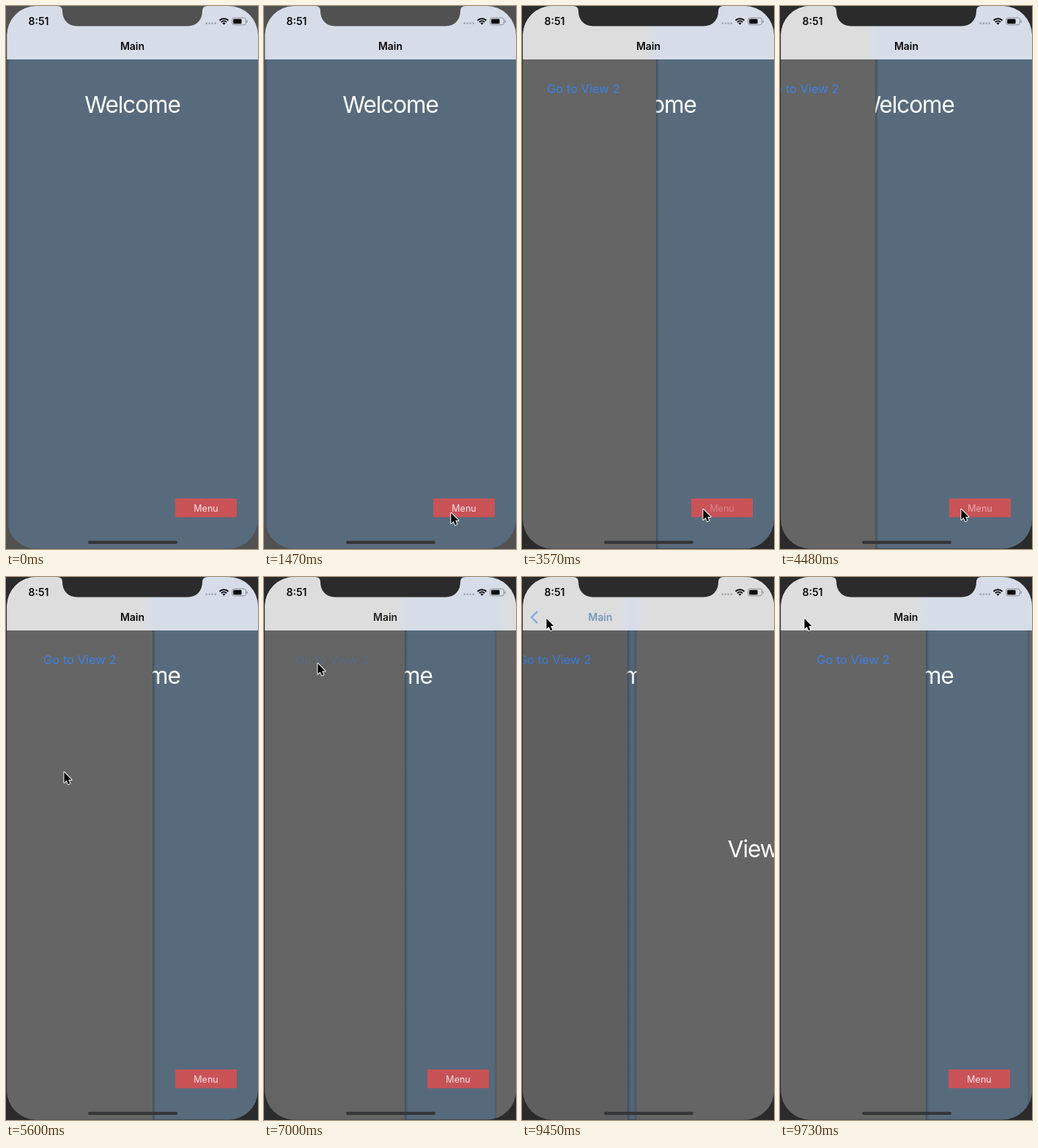
Recreate the animation shown at these times as an HTML page with a canvas. Size 344 by 742 pixels, loop 9.8 s.

```html
<!DOCTYPE html>
<html lang="en">
<head>
<meta charset="utf-8">
<title>Side menu</title>
<style>
  html, body { margin: 0; width: 100%; height: 100%; overflow: hidden; background: #2b2b2b; }
  canvas { display: block; width: 344px; height: 742px; }
</style>
</head>
<body>
<canvas id="stage"></canvas>
<script>
const W = 344, H = 742, LOOP = 9800, STEP = 70;
const MENU_W = 199, BAR_H = 73, PARALLAX = 103;
const SLATE = '#586b7d', GREY = '#656565', BLUE = '#3b82e6', INK = '#0a0a0c';
const BAR_SLATE = '#d7dde8', BAR_GREY = '#dddddd';
const PUSH = 6975, POP = 9366;
const FONT = 'Inter, Roboto, sans-serif';

const canvas = document.getElementById('stage');
const ratio = window.devicePixelRatio || 1;
canvas.width = W * ratio;
canvas.height = H * ratio;
const ctx = canvas.getContext('2d');

const clamp = v => Math.max(0, Math.min(1, v));
const smooth = v => { v = clamp(v); return v * v * (3 - 2 * v); };
const spring = ms => {
  const x = Math.max(0, ms) * 0.01826;
  return 1 - (1 + x) * Math.exp(-x);
};

// Menu button taps: [finger down, finger up]
const taps = [[1890, 1945], [3380, 3480], [4060, 4180]];

// Cursor tip: [time, x, y]
const path = [
  [280, 300, 744], [700, 276, 712], [1260, 255, 692], [1470, 255, 692],
  [1750, 247, 687], [4900, 247, 687], [5600, 79, 266], [5900, 79, 266],
  [6400, 71, 98], [6720, 73, 117.5], [8200, 73, 117.5], [8470, 44, 88.5],
  [8820, 35, 38], [9240, 33, 56], [9800, 33, 56]
];

function cursorAt(t) {
  if (t < path[0][0]) return null;
  let i = 0;
  while (i < path.length - 2 && t >= path[i + 1][0]) i++;
  const [t0, x0, y0] = path[i], [t1, x1, y1] = path[i + 1];
  const k = smooth((t - t0) / (t1 - t0));
  return [x0 + (x1 - x0) * k, y0 + (y1 - y0) * k];
}

function menuOpen(t) {
  const moved = taps.map(([, up]) => smooth((t - up) / 500));
  return moved[0] - moved[1] + moved[2];
}

function pressAlpha(t, down, up, fade) {
  if (t < down) return 1;
  return t < up ? 0.2 : 0.2 + 0.8 * clamp((t - up) / fade);
}

function menuLabelAlpha(t) {
  return Math.min(...taps.map(([down, up]) => pressAlpha(t, down, up, 600)));
}

function rect(x, y, w, h, color) {
  ctx.fillStyle = color;
  ctx.fillRect(x, y, w, h);
}

function pill(x, y, w, h, r, color) {
  ctx.fillStyle = color;
  ctx.beginPath();
  ctx.roundRect(x, y, w, h, r);
  ctx.fill();
}

function text(str, x, y, size, color, { weight = 400, align = 'center', alpha = 1, spacing = 0 } = {}) {
  ctx.font = `${weight} ${size}px ${FONT}`;
  ctx.letterSpacing = spacing + 'px';
  ctx.textAlign = align;
  ctx.fillStyle = color;
  ctx.globalAlpha = clamp(alpha);
  ctx.fillText(str, x, y);
  ctx.globalAlpha = 1;
}

function shade(x, w, strength) {
  const g = ctx.createLinearGradient(x, 0, x + w, 0);
  g.addColorStop(0, `rgba(0,0,0,${strength})`);
  g.addColorStop(1, 'rgba(0,0,0,0)');
  rect(Math.min(x, x + w), BAR_H, Math.abs(w), H, g);
}

function mainView(t, shift, open) {
  const edge = 1 + MENU_W * open;
  ctx.save();
  ctx.translate(-shift, 0);
  rect(0, 0, W + PARALLAX, H, SLATE);
  text('Welcome', 172.5, 146, 31.5, '#fff', { spacing: -1.1 });
  rect(231, 673, 84, 25.5, '#c95357');
  text('Menu', 273, 691, 12.5, '#f6e6e7', { alpha: menuLabelAlpha(t) });
  shade(edge, 4.5, 0.26);
  rect(edge - 220, 0, 220, H, GREY);
  text('Go to View 2', edge - 149, 119, 16.5, BLUE,
    { align: 'left', alpha: pressAlpha(t, 6720, 6960, 500) });
  ctx.restore();
}

function secondView(x) {
  if (x >= W) return;
  if (x > 1.5) shade(x, -4, 0.16);
  rect(x, 0, W, H, GREY);
  text('View 2', x + 171.5, 383, 31.5, '#fff', { spacing: -1.1 });
}

function softEdge(x0, x1, from, to) {
  const g = ctx.createLinearGradient(x0, 0, x1, 0);
  g.addColorStop(0, from);
  g.addColorStop(1, to);
  return g;
}

function navBar(t, q, shift, open, x) {
  rect(0, 0, W, BAR_H, BAR_SLATE);
  const edge = 1 + MENU_W * open - shift;
  if (open > 0) {
    rect(0, 0, edge + 2, BAR_H, softEdge(edge - 14, edge + 2, BAR_GREY, BAR_SLATE));
  }
  if (x < W) {
    const soft = 24 * (1 - q) + 0.1;
    rect(x, 0, W, BAR_H, softEdge(x, x + soft, 'rgba(221,221,221,0)', BAR_GREY));
  }
  const slide = 131.5 * Math.pow(q, 1.15);
  text('Main', 172.5 - slide, 60, 14, INK, { weight: 600, alpha: 1 - q * 1.4 });
  if (q < 0.1) return;
  const pressed = t >= 9240 && t < POP ? 0.3 : 1;
  const alpha = clamp((q - 0.1) / 0.8) * pressed;
  text('Main', 172.5 - slide, 60, 14, BLUE, { alpha });
  ctx.globalAlpha = alpha;
  ctx.strokeStyle = BLUE;
  ctx.lineWidth = 2.4;
  ctx.beginPath();
  ctx.moveTo(21, 47);
  ctx.lineTo(13, 55);
  ctx.lineTo(21, 63);
  ctx.stroke();
  ctx.globalAlpha = 1;
}

function wifi() {
  const cx = 297.5, cy = 25.7, a = -Math.PI * 0.75, b = -Math.PI * 0.25;
  ctx.strokeStyle = ctx.fillStyle = INK;
  ctx.lineWidth = 2;
  for (const r of [5.1, 8.5]) {
    ctx.beginPath();
    ctx.arc(cx, cy, r, a, b);
    ctx.stroke();
  }
  ctx.beginPath();
  ctx.moveTo(cx, cy);
  ctx.arc(cx, cy, 3, a, b);
  ctx.fill();
}

function statusBar() {
  text('8:51', 44.5, 26, 14, INK, { weight: 600 });
  for (let i = 0; i < 4; i++) pill(272.3 + i * 4, 22.3, 2.8, 2.8, 1.4, '#a5a9b1');
  wifi();
  ctx.strokeStyle = '#8b8e94';
  ctx.lineWidth = 1;
  ctx.beginPath();
  ctx.roundRect(308.7, 16.2, 18.8, 9.6, 2.6);
  ctx.stroke();
  pill(310.2, 17.7, 11.4, 6.6, 1.3, INK);
  pill(328.6, 19.4, 1.3, 3.4, 0.7, '#8b8e94');
}

function notch(color) {
  ctx.fillStyle = color;
  ctx.beginPath();
  ctx.moveTo(70, -1);
  ctx.lineTo(70, 0);
  ctx.quadraticCurveTo(77, 0, 77, 7);
  ctx.bezierCurveTo(77, 19, 85, 27.5, 97, 27.5);
  ctx.lineTo(248, 27.5);
  ctx.bezierCurveTo(260, 27.5, 268, 19, 268, 7);
  ctx.quadraticCurveTo(268, 0, 275, 0);
  ctx.lineTo(275, -1);
  ctx.fill();
}

function pointer([x, y]) {
  ctx.save();
  ctx.translate(x, y);
  ctx.beginPath();
  [[0.4, 0.8], [0.4, 15], [3.7, 11.9], [6, 17.2], [8.4, 16.2], [6.2, 11], [10.5, 11]]
    .forEach(([px, py]) => ctx.lineTo(px, py));
  ctx.closePath();
  ctx.lineJoin = 'round';
  ctx.lineWidth = 2;
  ctx.strokeStyle = '#fff';
  ctx.stroke();
  ctx.fillStyle = '#000';
  ctx.fill();
  ctx.restore();
}

function draw(t) {
  const frame = t < 1890 ? '#515151' : '#2b2b2b';
  let q = spring(t - PUSH) - spring(t - POP);
  if (q > 0.998) q = 1;
  const shift = PARALLAX * q;
  const open = menuOpen(t);
  const x = q > 0 ? 1 + 343 * (1 - q) : W;

  ctx.setTransform(ratio, 0, 0, ratio, 0, 0);
  rect(0, 0, W, H, frame);
  ctx.save();
  ctx.beginPath();
  ctx.roundRect(1.3, 0, 342.7, 741.5, 40);
  ctx.clip();
  mainView(t, shift, open);
  if (q > 0) rect(0, 0, W, H, `rgba(0,0,0,${0.1 * q})`);
  secondView(x);
  navBar(t, q, shift, open, x);
  statusBar();
  pill(112, 730.8, 122, 4.2, 2.1, '#343638');
  ctx.restore();
  notch(frame);

  const tip = cursorAt(t);
  if (tip) pointer(tip);
}

function tick() {
  const t = performance.now() % LOOP;
  draw(Math.floor(t / STEP) * STEP);
  requestAnimationFrame(tick);
}
tick();
</script>
</body>
</html>
```
